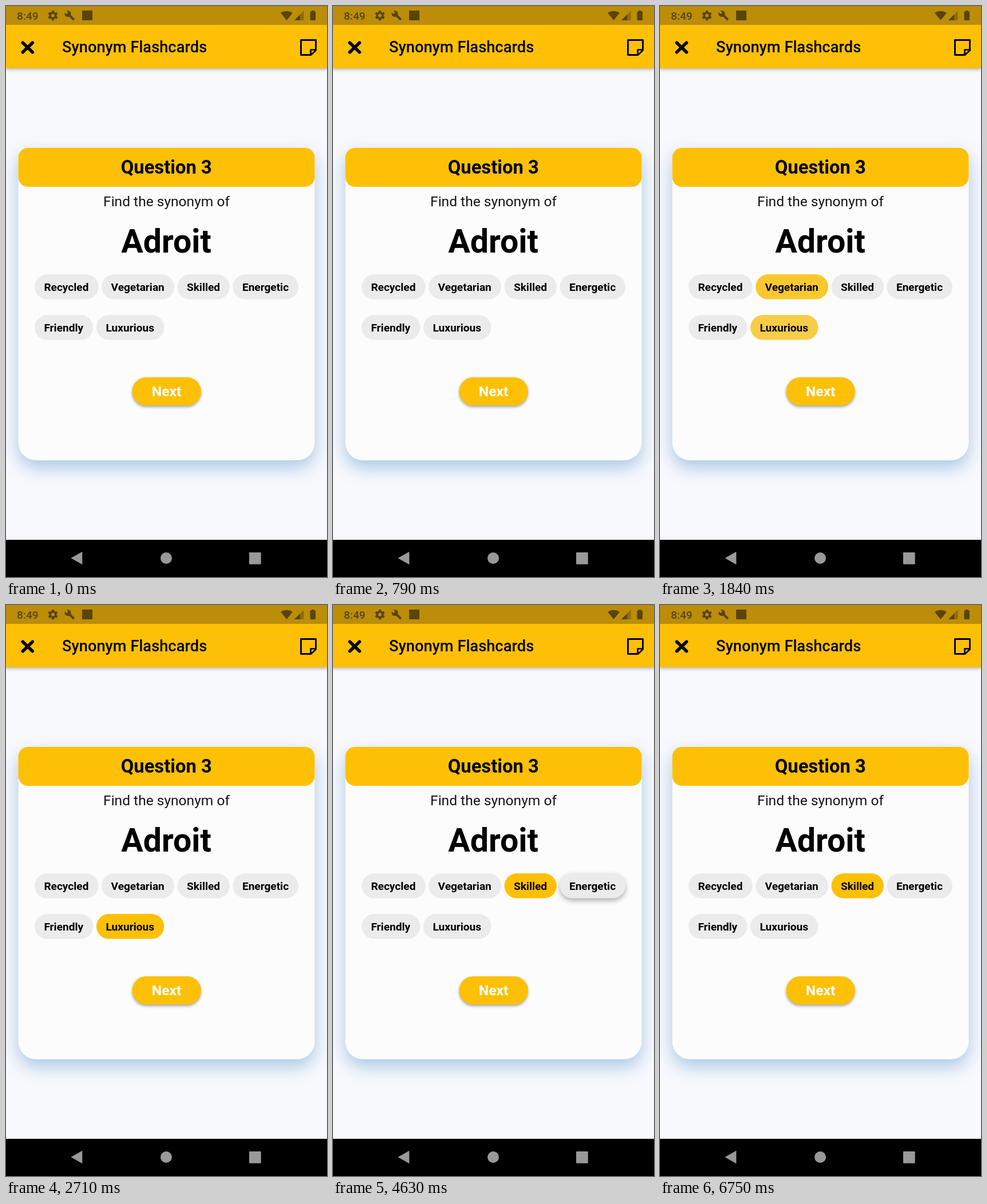
Recreate the animation shown at these times as an HTML page with a canvas. Size 561 by 998 pixels, loop 6790 ms.

```html
<!DOCTYPE html>
<html lang="en">
<head>
<meta charset="utf-8">
<title>Synonym Flashcards</title>
<style>
html, body { margin: 0; width: 100%; height: 100%; overflow: hidden; background: #f8f9fd; }
canvas { display: block; width: 561px; height: 998px; }
</style>
</head>
<body>
<canvas id="stage"></canvas>
<script>
const W = 561, H = 998, LOOP = 6790;
const FADE = 195, HOLD = 110, LIFT = 75;
const AMBER = '#fdc004', DARK = '#5a4408', BAR = '#bb8d09';
const GREY_RGB = [235, 235, 235], AMBER_RGB = [253, 192, 4];

const canvas = document.getElementById('stage');
const ratio = window.devicePixelRatio || 1;
canvas.width = W * ratio;
canvas.height = H * ratio;
const ctx = canvas.getContext('2d');
ctx.scale(ratio, ratio);

const chips = [
  { label: 'Recycled', x: 50, y: 469, w: 111.7 },
  { label: 'Vegetarian', x: 167.2, y: 469, w: 126.8 },
  { label: 'Skilled', x: 299.5, y: 469, w: 91.4 },
  { label: 'Energetic', x: 396.5, y: 469, w: 114.5 },
  { label: 'Friendly', x: 50, y: 540, w: 102.3 },
  { label: 'Luxurious', x: 158, y: 540, w: 118.4 }
];

// Moment of release and the chip chosen then
const taps = [
  { at: 1000, chip: 1 },
  { at: 1752, chip: 5 },
  { at: 2900, chip: 0 },
  { at: 3770, chip: 2 },
  { at: 4700, chip: 3 },
  { at: 5510, chip: 2 }
];

const clamp = v => Math.max(0, Math.min(1, v));

// cubic-bezier(0.4, 0, 0.2, 1)
function ease(x) {
  if (x <= 0 || x >= 1) return clamp(x);
  let lo = 0, hi = 1;
  for (let i = 0; i < 24; i++) {
    const s = (lo + hi) / 2, r = 1 - s;
    if (1.2 * r * r * s + 0.6 * r * s * s + s * s * s < x) lo = s; else hi = s;
  }
  return lo * lo * (3 - 2 * lo);
}

function selection(index, t) {
  let value = 0;
  taps.forEach((tap, i) => {
    if (t < tap.at) return;
    const p = clamp((t - tap.at) / FADE);
    if (tap.chip === index) value = ease(p);
    else if (i > 0 && taps[i - 1].chip === index) value = ease(1 - p);
  });
  return value;
}

function pressure(index, t) {
  let value = 0;
  for (const tap of taps) {
    if (tap.chip !== index) continue;
    const rise = clamp((t - tap.at + HOLD) / LIFT);
    const fall = clamp((t - tap.at) / LIFT);
    value = Math.max(value, ease(rise) * (1 - ease(fall)));
  }
  return value;
}

function shadow(color, blur, dy) {
  ctx.shadowColor = color;
  ctx.shadowBlur = blur * ratio;
  ctx.shadowOffsetY = dy * ratio;
}

function noShadow() {
  shadow('transparent', 0, 0);
}

function box(x, y, w, h, radius, color) {
  ctx.fillStyle = color;
  ctx.beginPath();
  ctx.roundRect(x, y, w, h, radius);
  ctx.fill();
}

function disc(x, y, r, color) {
  ctx.fillStyle = color;
  ctx.beginPath();
  ctx.arc(x, y, r, 0, Math.PI * 2);
  ctx.fill();
}

function trace(points, close) {
  ctx.beginPath();
  points.forEach(([x, y], i) => i ? ctx.lineTo(x, y) : ctx.moveTo(x, y));
  if (close) ctx.closePath();
}

function shape(points, color) {
  trace(points, true);
  ctx.fillStyle = color;
  ctx.fill();
}

function stroke(points, width, color, close) {
  trace(points, close);
  ctx.lineWidth = width;
  ctx.strokeStyle = color;
  ctx.stroke();
}

function text(str, x, y, size, weight, color = '#000', align = 'center') {
  ctx.font = `${weight} ${size}px Roboto, sans-serif`;
  ctx.textAlign = align;
  ctx.fillStyle = color;
  ctx.fillText(str, x, y);
}

function gear(x, y) {
  ctx.save();
  ctx.translate(x, y);
  for (let i = 0; i < 6; i++) {
    box(-2.1, -8.6, 4.2, 4.5, 0.6, DARK);
    ctx.rotate(Math.PI / 3);
  }
  ctx.restore();
  disc(x, y, 6.6, DARK);
  disc(x, y, 2.9, BAR);
}

function wrench() {
  ctx.lineCap = 'butt';
  stroke([[108.5, 14], [118.7, 24]], 4, DARK);
  disc(108, 13.5, 5.6, DARK);
  stroke([[101, 6.5], [107.3, 12.8]], 4, BAR);
}

function statusBar() {
  box(0, 0, W, 33, 0, BAR);
  text('8:49', 19, 24, 19.09, 500, DARK, 'left');
  gear(82, 16.7);
  wrench();
  box(133, 8, 18, 17, 0, DARK);

  ctx.fillStyle = DARK;
  ctx.beginPath();
  ctx.moveTo(490.5, 25);
  ctx.lineTo(480, 12);
  ctx.quadraticCurveTo(490.5, 5.5, 501, 12);
  ctx.closePath();
  ctx.fill();

  shape([[504, 25], [520.5, 25], [520.5, 8.5]], '#8f6c09');
  shape([[504, 25], [514, 25], [514, 15]], DARK);
  box(531.5, 9.5, 9.5, 15.5, 1.3, DARK);
  box(534, 8, 4.5, 3, 0, DARK);
}

function appBar() {
  shadow('rgba(0,0,0,0.3)', 6, 2);
  box(0, 33, W, 76, 0, AMBER);
  noShadow();
  statusBar();

  ctx.lineCap = 'round';
  stroke([[29.3, 64.3], [46.3, 80.7]], 5.6, '#000');
  stroke([[46.3, 64.3], [29.3, 80.7]], 5.6, '#000');
  text('Synonym Flashcards', 98, 81, 27.27, 500, '#000', 'left');

  ctx.lineCap = 'butt';
  ctx.lineJoin = 'round';
  stroke([[515.5, 59.5], [541.5, 59.5], [541.5, 77.5], [533, 85.5], [515.5, 85.5]], 2.9, '#000', true);
  stroke([[541, 76.5], [532.5, 76.5], [532.5, 85]], 2.7, '#000');
}

function card() {
  shadow('rgba(150,188,222,0.8)', 30, 13);
  box(21.5, 248, 518, 546, [18, 18, 31, 31], '#fcfcfc');
  noShadow();
  box(21.5, 248, 518, 68, 17, AMBER);
  text('Question 3', 280.2, 293, 32.73, 700);
  text('Find the synonym of', 280.5, 350, 24.55, 400, '#151515');
  text('Adroit', 280, 431, 57.27, 700);
}

function chip({ label, x, y, w }, index, t) {
  const s = selection(index, t), p = pressure(index, t);
  const rgb = GREY_RGB.map((v, i) => Math.round(v + (AMBER_RGB[i] - v) * s));
  if (p > 0) shadow(`rgba(0,0,0,${0.38 * p})`, 11 * p, 5 * p);
  box(x, y, w, 43.6, 21.8, `rgb(${rgb})`);
  noShadow();
  text(label, x + 16.4, y + 28.6, 19.09, 700, '#000', 'left');
}

function nextButton() {
  shadow('rgba(0,0,0,0.36)', 5, 2.5);
  box(220.5, 649, 120.3, 49.3, 24.6, AMBER);
  noShadow();
  text('Next', 280.5, 682, 24.55, 700, '#fff');
}

function navBar() {
  box(0, 933, W, 65, 0, '#000');
  shape([[113.5, 965], [133.3, 953.7], [133.3, 976.3]], '#999');
  disc(280, 965, 10, '#999');
  box(425, 955, 20.7, 20.7, 1, '#999');
}

function draw(t) {
  box(0, 0, W, H, 0, '#f8f9fd');
  card();
  chips.forEach((c, i) => chip(c, i, t));
  nextButton();
  appBar();
  navBar();
}

const start = performance.now();
function tick() {
  draw((performance.now() - start) % LOOP);
  requestAnimationFrame(tick);
}
tick();
</script>
</body>
</html>
```
